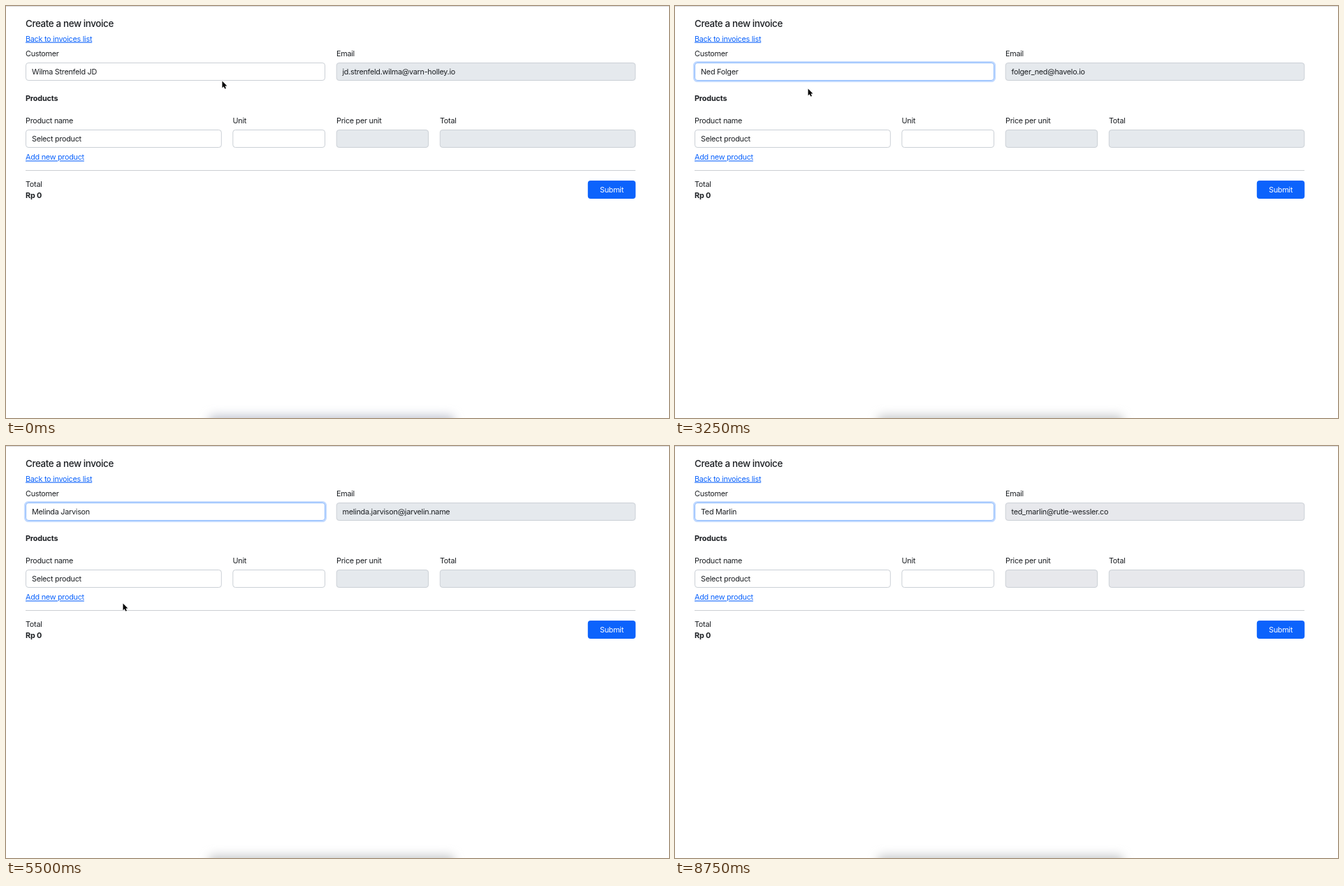
An HTML page that plays this animation: 949x590 px, repeating every 9 s.

```html
<!DOCTYPE html>
<html lang="en">
<head>
<meta charset="utf-8">
<title>Create a new invoice</title>
<style>
  html, body { margin: 0; width: 100%; height: 100%; overflow: hidden; background: #fff; }
  svg { display: block; width: 949px; height: 590px; }
  text { font: 400 10.8px Inter, Roboto, sans-serif; letter-spacing: -.26px; fill: #1c1f23; white-space: pre; }
  .title { font-size: 13.4px; font-weight: 500; letter-spacing: -.38px; }
  .bold { font-weight: 700; letter-spacing: -.15px; }
  .link { fill: #0c63fc; text-decoration: underline; }
  .white { fill: #fff; }
  .box { fill: #fff; stroke: #cbd0d6; }
  .off { fill: var(--off); }
  .line { fill: none; stroke: #111; stroke-width: 1.3; stroke-linecap: round; stroke-linejoin: round; }
</style>
</head>
<body>
<svg id="stage" viewBox="0 0 949 590" xmlns="http://www.w3.org/2000/svg">
  <defs>
    <filter id="soft" x="-20%" y="-100%" width="140%" height="300%"><feGaussianBlur stdDeviation="7"/></filter>
    <filter id="glow" x="-10%" y="-10%" width="120%" height="120%"><feGaussianBlur stdDeviation="5"/></filter>
    <clipPath id="rows"><rect x="23" y="0" width="428" height="571.5"/></clipPath>
  </defs>
  <rect width="949" height="590" fill="#fff"/>
  <rect id="dock" x="290" y="586" width="352" height="40" rx="8" filter="url(#soft)"/>
  <path d="M0 .5H949" stroke="#d8d9db"/>
  <g id="form"></g>
  <g id="menu">
    <rect x="23" y="-20" width="428" height="608" rx="6" opacity=".2" filter="url(#glow)"/>
    <rect x="22.75" y="-20" width="428.5" height="606" rx="5" fill="#ede4e4" stroke="#a9a3a4" stroke-width=".7"/>
    <rect id="bar" x="26" width="422" height="17.5" rx="3" fill="#4596fe"/>
    <g id="list" clip-path="url(#rows)"></g>
    <path id="tick" class="line" d="M29.8 96.7l1.9 2.2 3.6-5.6"/>
    <path class="line" d="M233.8 576.9l2.7 2.6 2.7-2.6"/>
  </g>
  <path id="cursor" d="M.5 .5V10.2L2.7 8.2L4.2 11.6L5.9 10.9L4.4 7.6H7.4Z" fill="#000" stroke="#fff" stroke-width="1" paint-order="stroke" stroke-linejoin="round"/>
</svg>
<script>
const NS = 'http://www.w3.org/2000/svg';
const $ = id => document.getElementById(id);

function add(parent, tag, attrs, label) {
  const el = document.createElementNS(NS, tag);
  for (const k in attrs) el.setAttribute(k, attrs[k]);
  if (label) el.textContent = label;
  return parent.appendChild(el);
}
const form = $('form');
const write = (x, y, label, cls = '') => add(form, 'text', { x, y, class: cls }, label);
const box = (x, y, width, cls = '') =>
  add(form, 'rect', { x, y, width, height: 25, rx: 3.6, class: 'box ' + cls });

write(28, 30, 'Create a new invoice', 'title');
write(28, 50.6, 'Back to invoices list', 'link');
write(28, 72.3, 'Customer');
write(473, 72.3, 'Email');
const ring = add(form, 'rect', { x: 27.2, y: 80.2, width: 430.6, height: 27.6, rx: 5, fill: 'none', stroke: '#c2daff', 'stroke-width': 2.6 });
const field = box(28.5, 81.5, 428);
box(473.2, 81.5, 427.6, 'off');
const customer = write(37, 98.4, '');
const email = write(481.5, 98.4, '');
write(28, 135.5, 'Products', 'bold');
write(28, 168, 'Product name');
write(324.5, 168, 'Unit');
write(473, 168, 'Price per unit');
write(621, 168, 'Total');
box(28.5, 177.5, 279.8);
box(324.8, 177.5, 131.7);
box(473.2, 177.5, 131.4, 'off');
box(621.3, 177.5, 279.5, 'off');
write(37, 194, 'Select product');
write(28, 220.4, 'Add new product', 'link');
add(form, 'path', { d: 'M28 235.5H901', stroke: '#cccfd2' });
write(28, 258.8, 'Total');
write(28, 275, 'Rp 0', 'bold');
add(form, 'rect', { x: 832.8, y: 250, width: 68.4, height: 26, rx: 4, fill: '#0c63fc' });
write(850, 267, 'Submit', 'white');

const people = `Cornelius Fennerly,Clark Vinter,Emilio Prandle,Walter Dorlune,Marlene Guttich,
Wilma Strenfeld JD,Lin Mosker,Gilbert Lowenhaum,Amb. Hollis Prein,Ned Folger,Msgr. Otis Vann,
Rosalind Tremann JD,Marissa Tolliver,Gov. Pablo Hessler,Dudley Pemberlin V,Genevieve Loppin,
Corinne Havelo MD,Everett Sorlow,Rep. Colette Varner,Fabiano Lue,Hugo Brannvaldsen,
Melinda Jarvison,Trudi Sabel,Dennis Tovar,Nora Stamhold,Pres. Finn Hardwell,Marietta Elsen,
Vic Calandretti,Melora Hobb,Zhang Lowd,Miriam Voog,Ira Millbridge,Belinda Orndt III,
Wesley Maynot,Norbert Lader,Bethany Crowes,Manuel Torvaldson,Elsa Brannock,Warren Plokes,
Latonya Brannock,Ted Marlin,Omari Fenkin,Cassadee Varge,Odelia Kroos,Frederic Poller,
Bruno Hoettner,Silvano Delroy,Kurt Lentz,Mona Bexley`.split(',').map(s => s.trim());

// Index of each chosen customer, with the email that belongs to it.
const picks = [
  [5, 'jd.strenfeld.wilma@varn-holley.io'],
  [9, 'folger_ned@havelo.io'],
  [21, 'melinda.jarvison@jarvelin.name'],
  [40, 'ted_marlin@rutle-wessler.co']
];

// The chosen row always opens over the field, five rows from the top.
const ROW = 17.52, FIRST = 7.7, ABOVE = 5;
const rows = Array.from({ length: 33 }, (_, i) =>
  add($('list'), 'text', { x: 39, y: FIRST + i * ROW + 3.8 }));

const IDLE = 0, FOCUS = 1, OPEN = 2, BLINK = 3, FADE = 4;
// time, cursor x, cursor y, pick, mode
const steps = [
  [0, 309, 107, 0, IDLE],
  [250, 298, 105, 0, IDLE],
  [500, 272, 102, 0, IDLE],
  [750, 256, 100, 0, IDLE],
  [1000, 254, 100, 0, OPEN],
  [1250, 253, 100, 0, OPEN],
  [1500, 232, 137, 0, OPEN],
  [1750, 210.5, 174, 0, OPEN],
  [2750, 210.5, 174, 0, FADE],
  [3000, 208, 170, 1, FOCUS],
  [3250, 190, 118, 1, FOCUS],
  [3500, 183, 101, 1, OPEN],
  [3750, 181.5, 106, 1, OPEN],
  [4000, 175, 220, 1, OPEN],
  [4250, 168.7, 313, 1, OPEN],
  [5000, 168.7, 313, 1, BLINK],
  [5250, 168.7, 310, 2, FOCUS],
  [5500, 167, 225, 2, FOCUS],
  [5750, 164, 118, 2, FOCUS],
  [6000, 163.5, 102, 2, FOCUS],
  [6250, 163.5, 102, 2, OPEN],
  [6500, 165, 200, 2, OPEN],
  [6750, 167, 345, 2, OPEN],
  [7000, 168, 432, 2, OPEN],
  [7500, 168, 432, 2, FADE],
  [7750, 180, 445, 3, FOCUS],
  [8000, 290, 540, 3, FOCUS],
  [8250, 330, 610, 3, IDLE],
  [8750, 330, 610, 3, FOCUS]
];

function draw(ms) {
  const t = ms % 9000;
  const [, x, y, pick, mode] = steps.findLast(s => s[0] <= t);
  const [chosen, address] = picks[pick];
  const hot = mode === BLINK ? -1 : Math.floor((y - FIRST) / ROW + .5);

  $('stage').style.setProperty('--off', t < 7500 ? '#e5e9ed' : '#e7e8ec');
  $('dock').setAttribute('fill', pick ? '#c9cbce' : '#c4c8d3');
  $('cursor').setAttribute('transform', `translate(${x} ${y})`);
  customer.textContent = people[chosen];
  email.textContent = address;
  ring.style.display = mode === IDLE ? 'none' : '';
  field.style.stroke = mode === IDLE ? '' : '#8bb9fd';

  $('menu').style.display = mode >= OPEN ? '' : 'none';
  $('menu').style.opacity = mode === FADE ? .94 : 1;
  $('bar').style.display = hot < 0 ? 'none' : '';
  $('bar').setAttribute('y', Math.round(FIRST + (hot - .5) * ROW));
  $('tick').style.stroke = hot === ABOVE ? '#fff' : '';
  rows.forEach((row, i) => {
    row.textContent = people[chosen - ABOVE + i] || '';
    row.setAttribute('class', i === hot ? 'white' : '');
  });
}

const start = performance.now();
function tick() {
  draw(performance.now() - start);
  requestAnimationFrame(tick);
}
tick();
</script>
</body>
</html>
```
